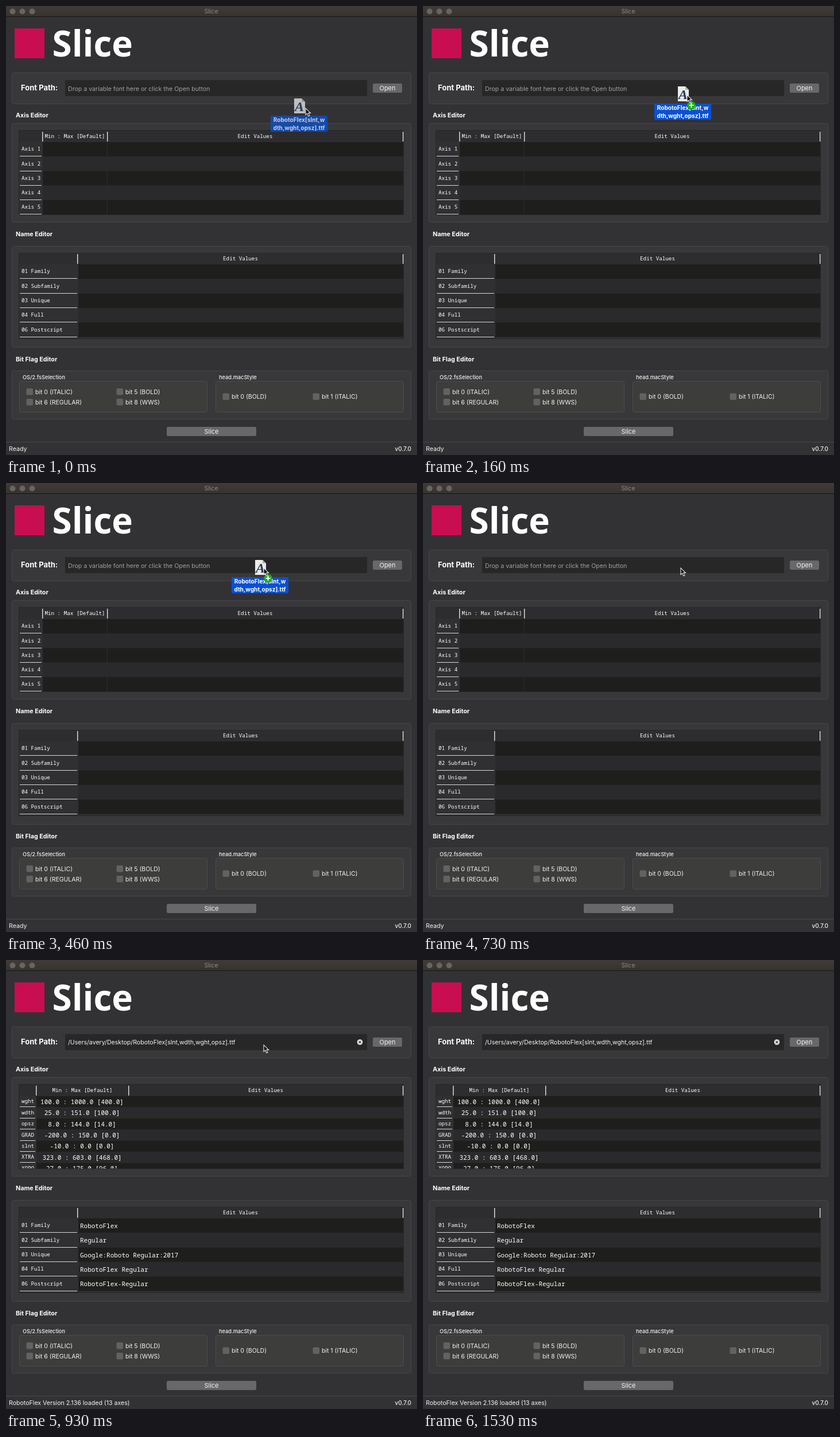
Animation of 716 by 782 pixels, one loop 2.13 s. Source, as an HTML page:

```html
<!DOCTYPE html>
<html lang="en">
<head>
<meta charset="utf-8">
<title>Slice</title>
<style>
  html, body { margin: 0; width: 100%; height: 100%; overflow: hidden; background: #323234; }
  svg { display: block; width: 716px; height: 782px; }
  text { font: 10.6px Inter, sans-serif; fill: #f4f4f4; white-space: pre; }
  .mid { text-anchor: middle; }
  .end { text-anchor: end; }
  .head { font-size: 10.75px; font-weight: 700; fill: #fff; }
  .path { font-size: 13px; font-weight: 700; fill: #fff; }
  .group { font-size: 9.2px; font-weight: 500; }
  .bit { font-size: 10.5px; }
  .button { font-size: 11px; }
  .dim { fill: #a0a0a0; }
  .title { fill: #8c8886; }
  .version { font-size: 10px; font-weight: 500; }
  .mono { font: 500 9.23px "Noto Sans Mono", monospace; fill: #fff; }
  .value { font: 500 10.97px "Noto Sans Mono", monospace; fill: #fff; }
  .file { font-size: 10.1px; font-weight: 700; fill: #fff; }
  .word { font: 700 62px "Open Sans", sans-serif; fill: #fff; }
  .glyph { font: italic 700 24px "Liberation Serif", serif; fill: #2c3a5c; }
</style>
</head>
<body>
<svg id="stage" viewBox="0 0 716 782" xmlns="http://www.w3.org/2000/svg">
  <defs>
    <linearGradient id="bar" x2="0" y2="1">
      <stop stop-color="#403b38"/><stop offset="1" stop-color="#38332f"/>
    </linearGradient>
    <clipPath id="axisClip"><rect x="22" y="216" width="671" height="147"/></clipPath>
  </defs>
</svg>
<script>
const NS = 'http://www.w3.org/2000/svg';
const stage = document.getElementById('stage');

function add(parent, tag, attrs = {}, content) {
  const node = document.createElementNS(NS, tag);
  for (const key in attrs) node.setAttribute(key, attrs[key]);
  if (content) node.textContent = content;
  return parent.appendChild(node);
}
const group = (parent = stage, attrs) => add(parent, 'g', attrs);
const rect = (parent, x, y, width, height, fill, more) =>
  add(parent, 'rect', { x, y, width, height, fill, ...more });
const label = (parent, x, y, content, cls = '') =>
  add(parent, 'text', { x, y, class: cls }, content);
const disc = (parent, cx, cy, r, fill) => add(parent, 'circle', { cx, cy, r, fill });
const tick = (parent, x, y) => rect(parent, x, y, 1.4, 17, '#e4e4e4');
const show = (node, on) => node.setAttribute('visibility', on ? 'visible' : 'hidden');
const move = (node, x, y) => node.setAttribute('transform', `translate(${x} ${y})`);

function panel(x, y, w, h, fill = '#38383a', stroke = '#474749') {
  rect(stage, x + .5, y + .5, w, h, fill, { stroke, rx: 3 });
}

function button(x, y, w, content) {
  rect(stage, x, y, w, 16, '#68686a', { rx: 2.5 });
  label(stage, x + w / 2, y + 12, content, 'mid button');
}

function checkbox(x, y, content) {
  rect(stage, x - 5.5, y - 5.5, 11.5, 11.5, '#626262', { rx: 2 });
  label(stage, x + 10, y + 4, content, 'bit');
}

// Striped table body with underlined row names; `split` is the left edge of the cells.
function rows(parent, names, top, pitch, split) {
  names.forEach((name, i) => {
    const y = top + i * pitch;
    rect(parent, split, y, 692 - split, pitch, i % 2 ? '#2a2a2c' : '#1e1f1c');
    label(parent, 27, y + pitch / 2 + 2.7, name, 'mono');
    rect(parent, 24, Math.round(y + pitch - 1), split - 26, 1, '#d8d8d8');
  });
}

function tableFrame(parent, y, h) {
  rect(parent, 22.5, y + .5, 670, h, '#303032', { stroke: '#262628' });
  rect(parent, 23, y + 1, 669, 19, '#2d2d2f');
}

// Window chrome
rect(stage, 0, 0, 716, 782, '#323234');
rect(stage, 0, 0, 716, 18, 'url(#bar)');
rect(stage, 0, 18, 716, 1, '#161616');
[11.5, 28.5, 45.5].forEach(x => disc(stage, x, 9.5, 5, '#686462'));
label(stage, 357.5, 13.3, 'Slice', 'mid title');
rect(stage, 15, 39, 52, 52, '#c80d50');
label(stage, 80.5, 87.5, 'Slice', 'word');

// Font path
panel(10, 116, 695, 54);
label(stage, 26, 147, 'Font Path:', 'path');
rect(stage, 103, 129, 526, 28, '#272728');
button(639, 135, 51, 'Open');

// Axis editor
label(stage, 17, 194, 'Axis Editor', 'head');
panel(10, 204, 695, 172);
tableFrame(stage, 216, 147);
const empty = group();
const loaded = group();
tick(stage, 691, 219);

function axisHeader(parent, split, edge) {
  tick(parent, split - 1, 219);
  tick(parent, edge, 219);
  label(parent, (split + edge) / 2, 230, 'Min : Max [Default]', 'mono mid');
  label(parent, (edge + 692) / 2, 230, 'Edit Values', 'mono mid');
}

rows(empty, [1, 2, 3, 4, 5].map(n => 'Axis ' + n), 237, 25.25, 64);
rect(empty, 176, 237, 1, 126, '#2c2c2d');
axisHeader(empty, 64, 176);

const axes = {
  wght: '100.0 : 1000.0 [400.0]', wdth: '25.0 : 151.0 [100.0]',
  opsz: '8.0 : 144.0 [14.0]', GRAD: '-200.0 : 150.0 [0.0]',
  slnt: '-10.0 : 0.0 [0.0]', XTRA: '323.0 : 603.0 [468.0]',
  XOPQ: '27.0 : 175.0 [96.0]'
};
const axisBody = group(loaded, { 'clip-path': 'url(#axisClip)' });
rows(axisBody, Object.keys(axes), 237, 19.4, 53);
Object.values(axes).forEach((range, i) =>
  label(axisBody, 132.5, 250.8 + i * 19.4, range, 'value mid'));
axisHeader(loaded, 53, 213);

// Name editor
label(stage, 17, 401, 'Name Editor', 'head');
panel(10, 418, 695, 176);
tableFrame(stage, 430, 149);
rows(stage, ['01 Family', '02 Subfamily', '03 Unique', '04 Full', '06 Postscript'], 450, 25.3, 126);
tick(stage, 124, 432);
tick(stage, 691, 432);
label(stage, 408.5, 443, 'Edit Values', 'mono mid');
const fontNames = group();
['RobotoFlex', 'Regular', 'Google:Roboto Regular:2017', 'RobotoFlex Regular', 'RobotoFlex-Regular']
  .forEach((name, i) => label(fontNames, 129, 467 + i * 25.3, name, 'value'));

// Bit flags
label(stage, 17, 619, 'Bit Flag Editor', 'head');
panel(10, 635, 695, 84);
label(stage, 29, 650, 'OS/2.fsSelection', 'group');
label(stage, 371, 650, 'head.macStyle', 'group');
panel(23, 653, 327, 54, '#3d3d3b', '#4c4c4b');
panel(365, 653, 327, 54, '#3d3d3b', '#4c4c4b');
checkbox(41, 671.5, 'bit 0 (ITALIC)');
checkbox(198, 671.5, 'bit 5 (BOLD)');
checkbox(41, 689.5, 'bit 6 (REGULAR)');
checkbox(198, 689.5, 'bit 8 (WWS)');
checkbox(383, 680, 'bit 0 (BOLD)');
checkbox(540, 680, 'bit 1 (ITALIC)');
button(280, 733, 156, 'Slice');

// Status bar
rect(stage, 0, 759, 716, 1, '#48484a');
label(stage, 706, 775, 'v0.7.0', 'end version');

// Texts that depend on the loaded font
label(empty, 108, 147.5, 'Drop a variable font here or click the Open button', 'dim');
label(empty, 5, 775, 'Ready');
label(loaded, 108, 147.3, '/Users/avery/Desktop/RobotoFlex[slnt,wdth,wght,opsz].ttf');
label(loaded, 5, 775, 'RobotoFlex Version 2.136 loaded (13 axes)');
stage.append(empty, loaded);
const clear = group(loaded);
disc(clear, 616.5, 143, 4.8, '#ececec');
add(clear, 'path', { d: 'M614.4 140.9l4.2 4.2m0-4.2l-4.2 4.2', stroke: '#272728', 'stroke-width': 1.2 });

// Dragged file, drop badge and pointer
const file = group();
add(file, 'path', { d: 'M41-30h13l6 6v20h-19z', fill: '#ececec' });
add(file, 'path', { d: 'M54-30v6h6z', fill: '#b4b4b4' });
label(file, 50, -8, 'A', 'glyph mid');
rect(file, 0, 0, 99, 28, '#0a50d2', { rx: 1.5 });
label(file, 49.5, 11.3, 'RobotoFlex[slnt,w', 'file mid');
label(file, 49.5, 24.5, 'dth,wght,opsz].ttf', 'file mid');

const badge = group();
disc(badge, 0, 0, 7.3, '#16b30e');
add(badge, 'path', { d: 'M-4 0h8M0-4v8', stroke: '#fff', 'stroke-width': 2 });

const pointer = add(stage, 'path', {
  d: 'M0 0V11.6L2.7 9.1L4.8 13.8L6.9 12.9L4.9 8.4H8.5Z',
  fill: '#111', stroke: '#e8e8e8', 'stroke-width': 1.1
});

const LOOP = 2130, TICK = 100 / 3;
const DROP = 18, LOAD = 23, LEAVE = 43;
const exitPath = [[471, 156], [562, 112], [692, 4]];

function draw(time) {
  const k = Math.floor((time % LOOP + 6.7) / TICK);
  const restX = Math.exp(-k / 2.6), restY = Math.exp(-k / 3.6);

  let x = Math.round(393 + 68 * restX), y = Math.round(163 + 28 * restY);
  let opacity = k < 4 ? .75 : 1;
  if (k >= DROP) opacity = Math.max(0, (LOAD - 1 - k) / 5);
  if (k > LOAD) {
    const back = (k - LOAD) / 2;
    x = 393 + 221 * back;
    y = 163 + 163 * back;
    opacity = k < 28 ? .75 : 0;
  }
  move(file, x, y);
  file.setAttribute('opacity', opacity);

  let px = Math.round(449 + 73 * restX), py = Math.round(147.5 + 30.5 * restY);
  move(badge, px + 7.5, py + 18);
  show(badge, k >= 4 && k < DROP);
  const exit = exitPath[k - LEAVE];
  if (exit) [px, py] = exit;
  move(pointer, px, py);
  show(pointer, k < LEAVE + exitPath.length);

  const ready = k >= LOAD;
  show(empty, !ready);
  show(loaded, ready);
  show(fontNames, ready);
  clear.setAttribute('opacity', Math.min(1, Math.max(0, (k - LOAD - .5) / 4.5)));
}

const start = performance.now();
function loop() {
  draw(performance.now() - start);
  requestAnimationFrame(loop);
}
loop();
</script>
</body>
</html>
```
